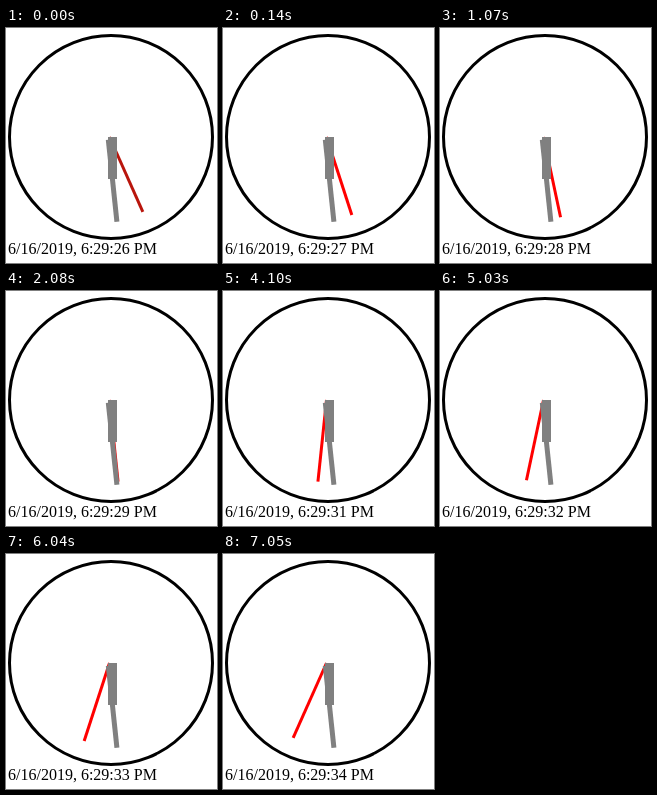
Write an HTML page that moves like this. It is 211x235 px and loops after 8 s.

```html
<!DOCTYPE html>
<html lang="en">
<head>
<meta charset="utf-8">
<title>Clock</title>
<style>
  html, body { margin: 0; width: 100%; height: 100%; overflow: hidden; background: #fff; }
  svg { display: block; }
  text { font: 16px "Liberation Serif", serif; }
</style>
</head>
<body>
<svg width="211" height="235" viewBox="0 0 211 235">
  <circle cx="105" cy="109" r="101.5" fill="none" stroke="#000" stroke-width="3"/>
  <rect id="second" x="102" y="27" width="3" height="82"/>
  <rect x="99.8" y="111.7" width="5" height="82.4" fill="gray" transform="rotate(-6 102.3 111.7)"/>
  <rect x="102" y="109" width="9" height="42" fill="gray"/>
  <text id="label" x="2" y="226"></text>
</svg>
<script>
  const LOOP = 8000;
  const FIRST_SECOND = 26;
  const ticks = [140, 1070, 2080, 3090, 4100, 5030, 6040, 7050];
  const hand = document.getElementById('second');
  const label = document.getElementById('label');
  const start = performance.now();
  let shown = -1;

  function draw(now) {
    const time = Math.max(0, now - start) % LOOP;
    const passed = ticks.filter(tick => tick <= time).length;
    if (passed !== shown) {
      shown = passed;
      const seconds = FIRST_SECOND + passed;
      hand.setAttribute('transform', `rotate(${seconds * 6} 103.5 109)`);
      hand.setAttribute('fill', passed ? '#f00' : '#b9150c');
      label.textContent = `6/16/2019, 6:29:${seconds} PM`;
    }
    requestAnimationFrame(draw);
  }
  draw(start);
</script>
</body>
</html>
```
